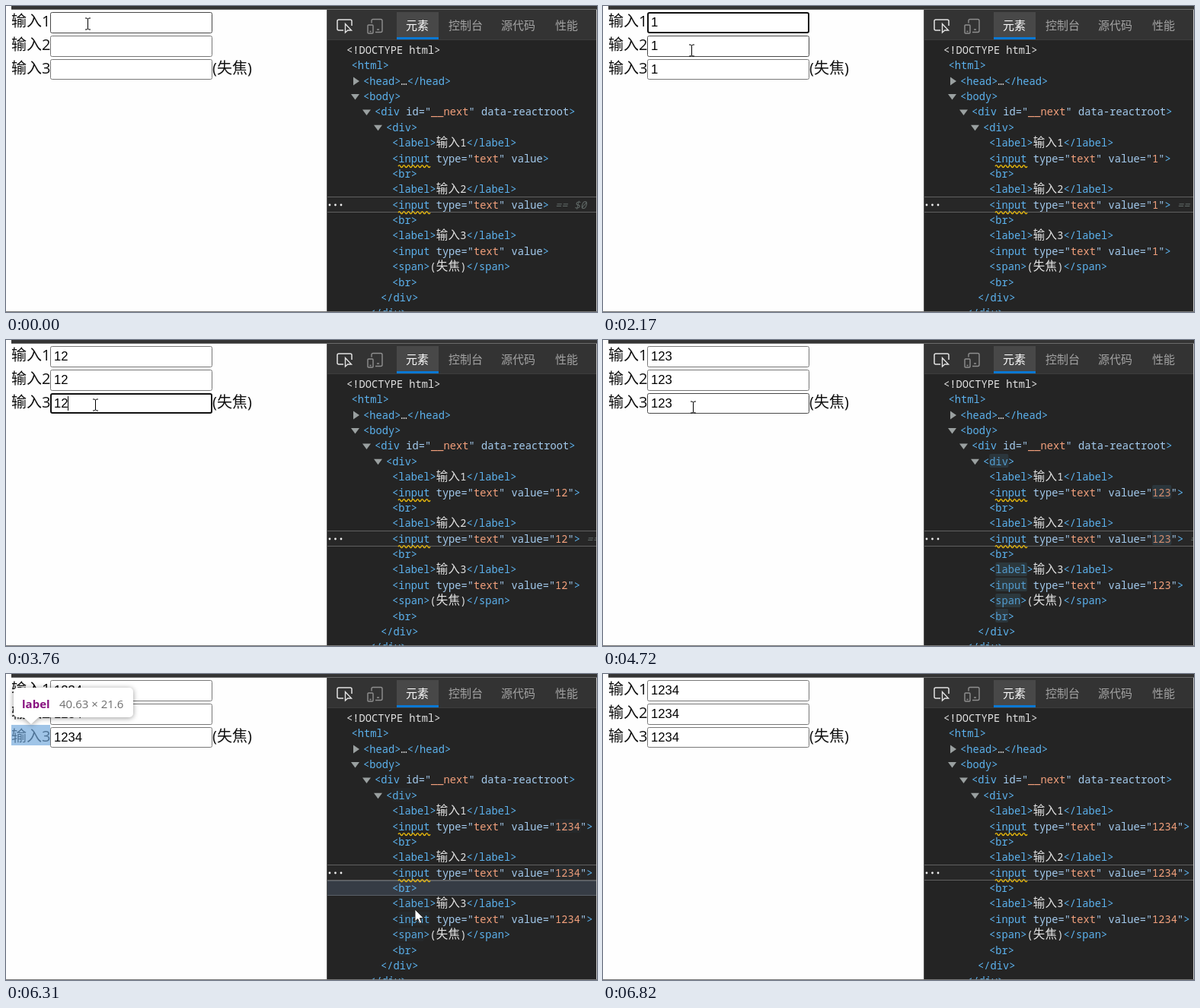
Recreate the animation shown at these times as an HTML page with a canvas. Size 776 by 403 pixels, loop 7.23 s.

```html
<!DOCTYPE html>
<html lang="zh">
<head>
<meta charset="utf-8">
<style>
  html, body { margin: 0; width: 100%; height: 100%; overflow: hidden; background: #fefefe; }
  canvas { display: block; }
</style>
</head>
<body>
<canvas id="stage" width="776" height="403"></canvas>
<script>
const ctx = document.getElementById('stage').getContext('2d');
const LOOP = 7230;
const CJK = '"Noto Sans CJK SC", "Noto Sans CJK", sans-serif';
const PAGE = `"Open Sans", ${CJK}`;
const MONO = '13.725px "Noto Sans Mono", monospace';
const ADVANCE = 8.235, HAN_ADVANCE = 15.8;
const ROW_Y = 58, ROW_STEP = 20.37;
const COLORS = { text: '#e2e2e2', tag: '#5cb2ee', name: '#a4cbee', value: '#f2a07c' };
const PANEL = [36, 36, 36];

const ticks = [0, 550, 1090, 1210, 1360, 1510, 1660, 1780, 1900, 2020, 2170, 2290, 2440,
  2710, 2830, 2980, 3100, 3220, 3370, 3490, 3640, 3760, 4030, 4180, 4300, 4450, 4570, 4720,
  4990, 5110, 5260, 5560, 5680, 5800, 5920, 6040, 6160, 6310, 6430, 6550, 6670, 6820];
// One entry per typed digit: shown in its own field, in the other fields, in the inspector.
const edits = [[1210, 1210, 1360], [2710, 2710, 2830], [4180, 4300, 4300], [5560, 5680, 5680]];
const focusChanges = [[0, -1], [550, 0], [2440, 1], [3640, 2], [4300, -1], [4990, 2], [5680, -1]];
const hoverChanges = [[0, -1], [6310, 11], [6430, 14], [6550, 16], [6670, -1]];
const mousePath = [[0, 107, 23], [1660, 107, 23], [2020, 115, 54], [2290, 117, 62], [3000, 117, 62],
  [3220, 117, 75], [3490, 117, 85], [4570, 117, 85], [4720, 118, 88], [5680, 118, 88],
  [5920, 210, 130], [6310, 537, 310], [6550, 600, 388], [6670, 640, 430]];

const latest = (list, t) => list.filter(e => e[0] <= t).pop();
const typed = (t, kind) => '1234'.slice(0, edits.filter(e => e[kind] <= t).length);

function mouseAt(t) {
  const i = mousePath.findIndex(p => p[0] > t);
  if (i < 0) return mousePath[mousePath.length - 1].slice(1);
  const [a, b] = [mousePath[i - 1], mousePath[i]];
  const k = (t - a[0]) / (b[0] - a[0]);
  return [a[1] + (b[1] - a[1]) * k, a[2] + (b[2] - a[2]) * k];
}

// cubic-bezier(0, 0, .2, 1)
function easeOut(x) {
  let lo = 0, hi = 1;
  for (let i = 0; i < 20; i++) {
    const s = (lo + hi) / 2;
    if (.6 * s * s + .4 * s ** 3 < x) lo = s; else hi = s;
  }
  return 3 * lo * lo - 2 * lo ** 3;
}

function flashProgress(t) {
  const edit = edits.filter(e => e[2] <= t).pop();
  return edit ? easeOut(Math.min(1, (t - edit[2] + 40) / 900)) : 1;
}

function fromPanel(hex, k) {
  const mixed = PANEL.map((p, i) => p + (parseInt(hex.slice(1 + 2 * i, 3 + 2 * i), 16) - p) * k);
  return `rgb(${mixed})`;
}

function rect(x, y, w, h, color) {
  ctx.fillStyle = color;
  ctx.fillRect(x, y, w, h);
}

function roundBox(x, y, w, h, r) {
  ctx.beginPath();
  ctx.roundRect(x, y, w, h, r);
}

function text(str, x, y, font, color) {
  ctx.font = font;
  ctx.fillStyle = color;
  ctx.fillText(str, x, y);
}

function shape(d, x, y, fill, stroke, width = 1) {
  const path = new Path2D(d);
  ctx.save();
  ctx.translate(x, y);
  ctx.lineWidth = width;
  if (fill) { ctx.fillStyle = fill; ctx.fill(path); }
  if (stroke) { ctx.strokeStyle = stroke; ctx.stroke(path); }
  ctx.restore();
}

function drawInputs(t, mouse) {
  const [since, focus] = latest(focusChanges, t);
  const lastKey = Math.max(since, ...edits.map(e => e[0]).filter(e => e <= t));
  for (let i = 0; i < 3; i++) {
    const top = 8 + i * 31, height = i === 2 ? 27 : 28;
    const value = typed(t, i === 2 ? 0 : 1);
    text('输入' + (i + 1), 7, top + 19, `20px ${PAGE}`, '#111');
    const hover = mouse[0] > 58 && mouse[0] < 271 && mouse[1] > top && mouse[1] < top + height;
    const focused = i === focus;
    const line = focused ? 2 : 1;
    roundBox(58 + line / 2, top + line / 2, 213 - line, height - line, 2);
    ctx.fillStyle = '#fff';
    ctx.fill();
    ctx.lineWidth = line;
    ctx.strokeStyle = focused ? '#101010' : hover ? '#484848' : '#777';
    ctx.stroke();
    text(value, 63, top + 19, '16.67px "Liberation Sans", Arial, sans-serif', '#000');
    if (focused && (t - lastKey) % 1000 < 500)
      rect(Math.floor(63 + ctx.measureText(value).width), top + 4, 1, 19, '#000');
  }
  text('(失焦)', 271, 89, `20px ${PAGE}`, '#111');
}

// Draws one line of markup; text in {} is highlighted after an update.
function drawMarkup(src, x, row, progress) {
  const middle = ROW_Y + row * ROW_STEP;
  const baseline = Math.round(middle + 5);
  let inTag = false, inAttrs = false, quoted = false, flash = false;
  [...src].forEach((ch, i) => {
    if (ch === '{') {
      flash = true;
      const length = src.indexOf('}', i) - i - 1;
      roundBox(x, Math.round(middle - 9.5), length * ADVANCE + .5, 18, 2);
      ctx.fillStyle = `rgba(84,160,196,${1 - progress})`;
      ctx.fill();
      return;
    }
    if (ch === '}') { flash = false; return; }
    if (ch === '<' && src[i + 1] !== '!') { inTag = true; inAttrs = false; }
    if (ch === ' ') inAttrs = true;
    if (ch === '"') quoted = !quoted;
    let color = COLORS.text;
    if (inTag) color = quoted && ch !== '"' ? COLORS.value : inAttrs && ch !== '>' ? COLORS.name : COLORS.tag;
    if (flash) color = fromPanel(color, progress);
    if (ch === '>') inTag = false;
    const han = /[\u4e00-\u9fff]/.test(ch);
    text(ch, x, baseline, han ? `300 15.5px ${CJK}` : MONO, color);
    x += han ? HAN_ADVANCE : ADVANCE;
  });
  return x;
}

function squiggle(row) {
  let d = 'M0 1.5';
  for (let i = 0; i < 7; i++) d += 'q1.5 -3 3 0t3 0';
  shape(d, 515, ROW_Y + row * ROW_STEP + 9, null, '#e8b90c', 1.3);
}

function drawToolbar() {
  rect(422, 5, 353, 40, '#333');
  rect(513, 8, 55, 37, '#484848');
  rect(513, 41, 55, 3, '#0a78d4');
  rect(422, 44, 353, 1, '#3d3d3d');
  shape('M8 14H2Q0 14 0 12V2Q0 0 2 0H17Q19 0 19 2V8', 435, 18, null, '#e4e4e4', 1.5);
  shape('M0 0V11.5L3.2 8.5H8Z', 445.5, 23.5, '#333', '#e4e4e4', 1.4);
  shape('M0 5V2Q0 0 2 0H12Q14 0 14 2V15Q14 17 12 17H5M7 13.5H10', 480, 17.5, null, '#8f8f8f', 1.4);
  shape('M1 0H6Q7 0 7 1V10Q7 11 6 11H1Q0 11 0 10V1Q0 0 1 0ZM2.5 8.5H4.5', 475, 25, null, '#8f8f8f', 1.4);
  [['元素', 525], ['控制台', 581], ['源代码', 650], ['性能', 721]].forEach(([label, x], i) =>
    text(label, x, 31, `15px ${CJK}`, i ? '#a3a3a3' : '#fff'));
}

function drawInspector(t) {
  const value = typed(t, 2), progress = flashProgress(t);
  const on = value && progress < 1;
  const mark = s => on ? `{${s}}` : s;
  const input = s => `<${s} type="text" value`;
  const synced = input('input') + (value ? `="${mark(value)}"` : '') + '>';
  const rows = [
    ['<!DOCTYPE html>', 447], ['<html>', 453.5], ['<head>…</head>', 469], ['<body>', 469],
    ['<div id="__next" data-reactroot>', 484], [`<${mark('div')}>`, 499],
    ['<label>输入1</label>', 507], [synced, 507], ['<br>', 507],
    ['<label>输入2</label>', 507], [synced, 507], ['<br>', 507],
    [`<${mark('label')}>输入3</label>`, 507],
    [input(mark('input')) + (value ? `="${value}"` : '') + '>', 507],
    [`<${mark('span')}>(失焦)</span>`, 507], [`<${mark('br')}>`, 507],
    ['</div>', 492], ['</div>', 477],
  ];

  ctx.save();
  ctx.beginPath();
  ctx.rect(421, 5, 354, 397);
  ctx.clip();
  rect(421, 5, 354, 397, '#242424');
  drawToolbar();
  rect(422, 251, 353, 21, '#272727');
  rect(422, 251, 353, 1, '#606060');
  rect(422, 271, 353, 1, '#606060');
  const hovered = latest(hoverChanges, t)[1];
  if (hovered >= 0) {
    const y = Math.round(ROW_Y - 10 + hovered * ROW_STEP);
    rect(422, y, 353, 20, '#5a6068');
    rect(422, y + 1, 353, 18, '#363c45');
  }

  rows.forEach(([src, x], row) => {
    const end = drawMarkup(src, x, row, progress);
    if (row === 10)
      text('== $0', end + ADVANCE, Math.round(ROW_Y + row * ROW_STEP + 5), 'italic ' + MONO, '#5f6866');
  });
  squiggle(7);
  squiggle(10);
  shape('M0 0L8 5.5L0 11Z', 456, 93.5, '#9aa0a0');
  [[453, 3], [468, 4], [483, 5]].forEach(([x, row]) =>
    shape('M0 0H11L5.5 7.5Z', x, ROW_Y - 3 + row * ROW_STEP, '#9aa0a0'));
  for (const x of [425, 432.5, 440]) {
    roundBox(x - 1.4, 260.6, 2.8, 2.8, 1.4);
    ctx.fillStyle = '#f0f0f0';
    ctx.fill();
  }
  ctx.restore();
  rect(421, 5, 1, 397, '#555');
}

function drawTooltip() {
  rect(7, 67, 51, 27, 'rgba(111,168,220,.66)');
  ctx.save();
  ctx.shadowColor = 'rgba(0,0,0,.4)';
  ctx.shadowBlur = 7;
  ctx.shadowOffsetY = 1;
  roundBox(10, 18, 157, 39, 5);
  ctx.moveTo(23, 57);
  ctx.lineTo(33, 66);
  ctx.lineTo(43, 57);
  ctx.fillStyle = '#fff';
  ctx.fill();
  ctx.restore();
  text('label', 21, 45, '700 15px "Open Sans", sans-serif', '#881280');
  text('40.63 × 21.6', 70, 45, '15px "Open Sans", sans-serif', '#6e6e6e');
}

function drawMouse([x, y]) {
  if (x < 271 && y < 98)
    shape('M-3.5 -7.5H-1.5L0 -6.5L1.5 -7.5H3.5M0 -6.5V6.5M-3.5 7.5H-1.5L0 6.5L1.5 7.5H3.5',
      Math.round(x) + .5, Math.round(y) + .5, null, '#000');
  else
    shape('M0 0V16L3.7 12.6L6.2 18.4L8.8 17.2L6.4 11.6H11.4Z', x, y, '#fff', '#222');
}

function render(t) {
  const mouse = mouseAt(t);
  rect(0, 0, 776, 403, '#fefefe');
  drawInputs(t, mouse);
  if (latest(hoverChanges, t)[1] === 11) drawTooltip();
  rect(7, 0, 769, 4, '#343434');
  rect(7, 4, 769, 1, '#6a6a6a');
  drawInspector(t);
  rect(775, 5, 1, 398, '#c4c4c4');
  rect(0, 402, 776, 1, '#777');
  if (t < 6670) drawMouse(mouse);
}

function frame() {
  const now = performance.now() % LOOP;
  render(ticks.filter(tick => tick <= now).pop());
  requestAnimationFrame(frame);
}
frame();
</script>
</body>
</html>
```
